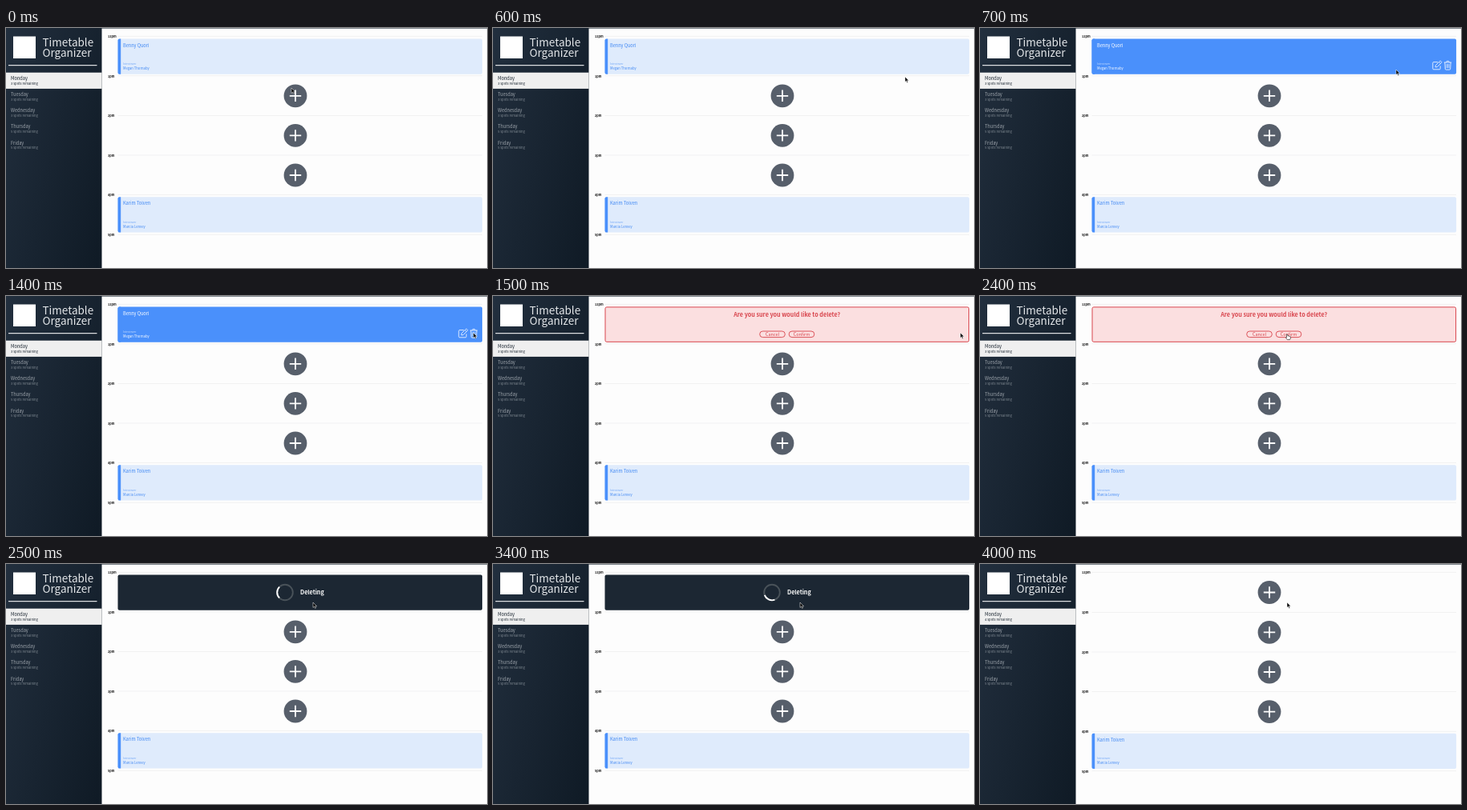
An HTML page for the animation above (4100 ms loop, 600x300 px).

```html
<!DOCTYPE html>
<html lang="en">
<head>
<meta charset="utf-8">
<title>Booking day view</title>
<style>
  html, body { margin: 0; width: 100%; height: 100%; overflow: hidden; background: #fdfdfd; }
  svg { display: block; width: 100vw; height: 100vh; }
  text { font-family: "Noto Sans CJK JP", "Noto Sans CJK SC", "Noto Sans CJK", "Open Sans", sans-serif; }
  .title { font-size: 13.5px; font-weight: 300; fill: #e3e6e9; }
  .day { font-size: 5.6px; fill: #9fa6ad; }
  .spots { font-size: 4.1px; fill: #7f8891; }
  .active { fill: #1b2631; }
  .hour { font-size: 3.8px; font-weight: 700; fill: #111; }
  .name { font-size: 5.6px; }
  .label { font-size: 3.1px; opacity: .7; }
  .host { font-size: 4.2px; }
  .strong { font-size: 7.2px; font-weight: 700; }
  .pill { font-size: 5.5px; text-anchor: middle; fill: #d8444c; }
</style>
</head>
<body>
<svg id="stage" viewBox="0 0 600 300">
  <defs>
    <linearGradient id="night" gradientUnits="userSpaceOnUse" x1="151.5" y1="172.8" x2="-31.5" y2="127.2">
      <stop offset="0" stop-color="#0f1a25"/>
      <stop offset="1" stop-color="#222f3e"/>
    </linearGradient>
  </defs>
  <rect width="600" height="300" fill="#fdfdfd"/>
  <rect x="119" width="481" height=".7" fill="#4a545e"/>

  <g id="sidebar">
    <rect width="119.5" height="300" fill="url(#night)"/>
    <rect x="9" y="10.5" width="28" height="27.5" fill="#fff"/>
    <text class="title" x="45.5" y="23">Timetable</text>
    <text class="title" x="45.5" y="36">Organizer</text>
    <rect x="3" y="46.1" width="110.5" height="1.1" fill="#f2f3f4"/>
    <rect y="55.7" width="119.5" height="20.2" fill="#efefef"/>
  </g>

  <g id="hours"></g>
  <g id="slots"></g>

  <g id="confirm">
    <rect x="140" y="13.9" width="453.6" height="43.4" rx="1.8" fill="#fbdfe0" stroke="#d8444c"/>
    <text class="strong" x="366.7" y="26" text-anchor="middle" fill="#d8444c">Are you sure you would like to delete?</text>
    <g fill="none" stroke="#d8444c" stroke-width=".9">
      <rect x="332.7" y="44" width="31.6" height="7.6" rx="3.8"/>
      <rect x="369.2" y="44" width="31.6" height="7.6" rx="3.8"/>
    </g>
    <text class="pill" x="348.5" y="49.7">Cancel</text>
    <text class="pill" x="385" y="49.7">Confirm</text>
  </g>

  <g id="status">
    <rect x="139.5" y="13.4" width="454.6" height="44.3" rx="2" fill="#1c2733"/>
    <g fill="none" stroke-width="1.9">
      <circle cx="348" cy="35.5" r="9.8" stroke="#495259"/>
      <path id="arc" d="M341.07 42.43A9.8 9.8 0 0 1 341.07 28.57" stroke="#fff"/>
    </g>
    <text class="strong" x="367" y="38.1" fill="#fff">Deleting</text>
  </g>

  <g id="cursor">
    <path id="arrow" d="M0 0V6.4L1.5 5.1L2.5 7.4L3.6 6.9L2.6 4.7H4.6Z"
      fill="#000" stroke="#fff" stroke-width=".5" stroke-linejoin="round"/>
    <path id="hand" d="M-.7 .1Q0 -.7 .6 .2L1.1 2.1Q1.8 1.6 2.3 2.2Q3 1.8 3.4 2.5Q4.3 2.3 4.4 3.3L4.3 5.1L3.5 6.6H.4L-1.7 4.1Q-1.6 3.2 -.4 3.8Z"
      fill="#fff" stroke="#111" stroke-width=".6" stroke-linejoin="round"/>
  </g>
</svg>

<script>
const LOOP = 4100, STEP = 100;
const HOVER = 700, ASK = 1500, DELETE = 2500, DONE = 3600;
const PITCH = 49.6, EMPTY_SHIFT = 0.6;
const BLUE = '#4a90fb', PALE = '#dfebfc', INK = '#3f87f3';
const PLUS = '#575f6b', PLUS_HOVER = '#1a2530';

// time, x, y of the pointer tip
const path = [
  [0, 356, 75], [600, 514, 61], [700, 519, 52], [1200, 583, 46],
  [1500, 583, 46], [2000, 367, 71], [2400, 383, 48]
];

const $ = id => document.getElementById(id);

function add(parent, tag, attrs, text) {
  const el = document.createElementNS('http://www.w3.org/2000/svg', tag);
  for (const key in attrs) el.setAttribute(key, attrs[key]);
  if (text) el.textContent = text;
  return parent.appendChild(el);
}

const show = (el, on) => el.setAttribute('display', on ? 'inline' : 'none');
const shift = (el, x, y) => el.setAttribute('transform', `translate(${x} ${y})`);

function addDay(name, spots, i) {
  const y = 64.7 + i * 20.2, on = i ? '' : ' active';
  add($('sidebar'), 'text', { class: 'day' + on, x: 6, y }, name);
  return add($('sidebar'), 'text', { class: 'spots' + on, x: 6, y: y + 5.9 }, spots + ' spots remaining');
}

function addHour(label, i) {
  const g = add($('hours'), 'g', {});
  const y = 10.6 + i * PITCH;
  add(g, 'text', { class: 'hour', x: 127, y: y + 1.4 }, label);
  add(g, 'rect', { x: 139.5, y: y - 0.7, width: 454.5, height: 0.6, fill: '#e9e9ea' });
  return g;
}

function addPlus(y) {
  const g = add($('slots'), 'g', {});
  const disc = add(g, 'circle', { cx: 361, cy: y, r: 14.4, fill: PLUS });
  add(g, 'path', { d: `M353.8 ${y}h14.4M361 ${y - 7.2}v14.4`, stroke: '#fff', 'stroke-width': 1.8 });
  return { g, disc };
}

function addCard(y, name, host, hovered) {
  const g = add($('slots'), 'g', {});
  const ink = hovered ? '#fff' : INK;
  add(g, 'rect', { x: 139.5, y, width: 454.6, height: 44.3, rx: 2, fill: hovered ? BLUE : PALE });
  add(g, 'path', { d: `M143.2 ${y}h-1.7q-2 0-2 2v40.3q0 2 2 2h1.7z`, fill: BLUE });
  add(g, 'text', { class: 'name', x: 146, y: y + 10.2, fill: ink }, name);
  add(g, 'text', { class: 'label', x: 146, y: y + 32.5, fill: ink }, 'Interviewer');
  add(g, 'text', { class: 'host', x: 146, y: y + 38.3, fill: ink }, host);
  if (hovered) addIcons(g);
  return g;
}

function addIcons(parent) {
  const g = add(parent, 'g', {
    fill: 'none', stroke: '#eaf2ff', 'stroke-width': 0.9, 'stroke-linejoin': 'round'
  });
  // pen on a sheet
  add(g, 'path', { d: 'M571 42.6h-5.2q-1 0-1 1v7.2q0 1 1 1h7.4q1 0 1-1v-3.4' });
  add(g, 'path', { d: 'M568 48.9l.4-2.3 5.2-5.2q.6-.5 1.2 0l.8.8q.5.6 0 1.2l-5.2 5.2zM572.5 42.5l2 2' });
  // bin
  add(g, 'path', { d: 'M578.9 43h9.2M581.6 43l.7-1.6h2.4l.7 1.6M579.8 43l.5 8.2q.1.9 1 .9h4.4q.9 0 1-.9l.5-8.2' });
  add(g, 'path', { d: 'M581.9 45v5M583.5 45v5M585.1 45v5', 'stroke-width': 0.7 });
}

const days = [['Monday', 3], ['Tuesday', 3], ['Wednesday', 3], ['Thursday', 5], ['Friday', 5]]
  .map(([name, spots], i) => addDay(name, spots, i));
const hours = ['12pm', '1pm', '2pm', '3pm', '4pm', '5pm'].map(addHour);
const pluses = [35.5, 84.8, 134.4, 184].map(addPlus);
const booked = addCard(13.4, 'Benny Quorl', 'Megan Thornaby', false);
const hovered = addCard(13.4, 'Benny Quorl', 'Megan Thornaby', true);
const later = addCard(211.2, 'Karim Tolven', 'Marcia Lenvey', false);

function pointer(t) {
  const i = path.findIndex(p => p[0] > t);
  if (i < 0) return path[path.length - 1].slice(1);
  const [t0, x0, y0] = path[i - 1], [t1, x1, y1] = path[i];
  const u = (t - t0) / (t1 - t0), e = u * u * (3 - 2 * u);
  return [x0 + (x1 - x0) * e, y0 + (y1 - y0) * e];
}

function draw(t) {
  const done = t >= DONE, drop = done ? EMPTY_SHIFT : 0;
  show(booked, t < HOVER);
  show(hovered, t >= HOVER && t < ASK);
  show($('confirm'), t >= ASK && t < DELETE);
  show($('status'), t >= DELETE && !done);
  show(pluses[0].g, done);

  days[0].textContent = (done ? 4 : 3) + ' spots remaining';
  hours.slice(1).forEach(g => shift(g, 0, drop));
  pluses.slice(1).forEach(p => shift(p.g, 0, drop));
  shift(later, 0, drop);

  $('arc').setAttribute('transform', `rotate(${(t - DELETE) / 1100 * 360} 348 35.5)`);

  const [x, y] = pointer(t);
  const overPlus = t > ASK && Math.hypot(x - 361, y - 84.8) < 15.2;
  const overPill = t > 2000 && t < DELETE && y > 44 && y < 51.6;
  pluses[1].disc.setAttribute('fill', overPlus ? PLUS_HOVER : PLUS);
  shift($('cursor'), x, y);
  show($('hand'), overPlus || overPill);
  show($('arrow'), !overPlus && !overPill);
}

const start = performance.now();
function tick() {
  const t = (performance.now() - start) % LOOP;
  draw(Math.floor(t / STEP) * STEP);
  requestAnimationFrame(tick);
}
tick();
</script>
</body>
</html>
```
